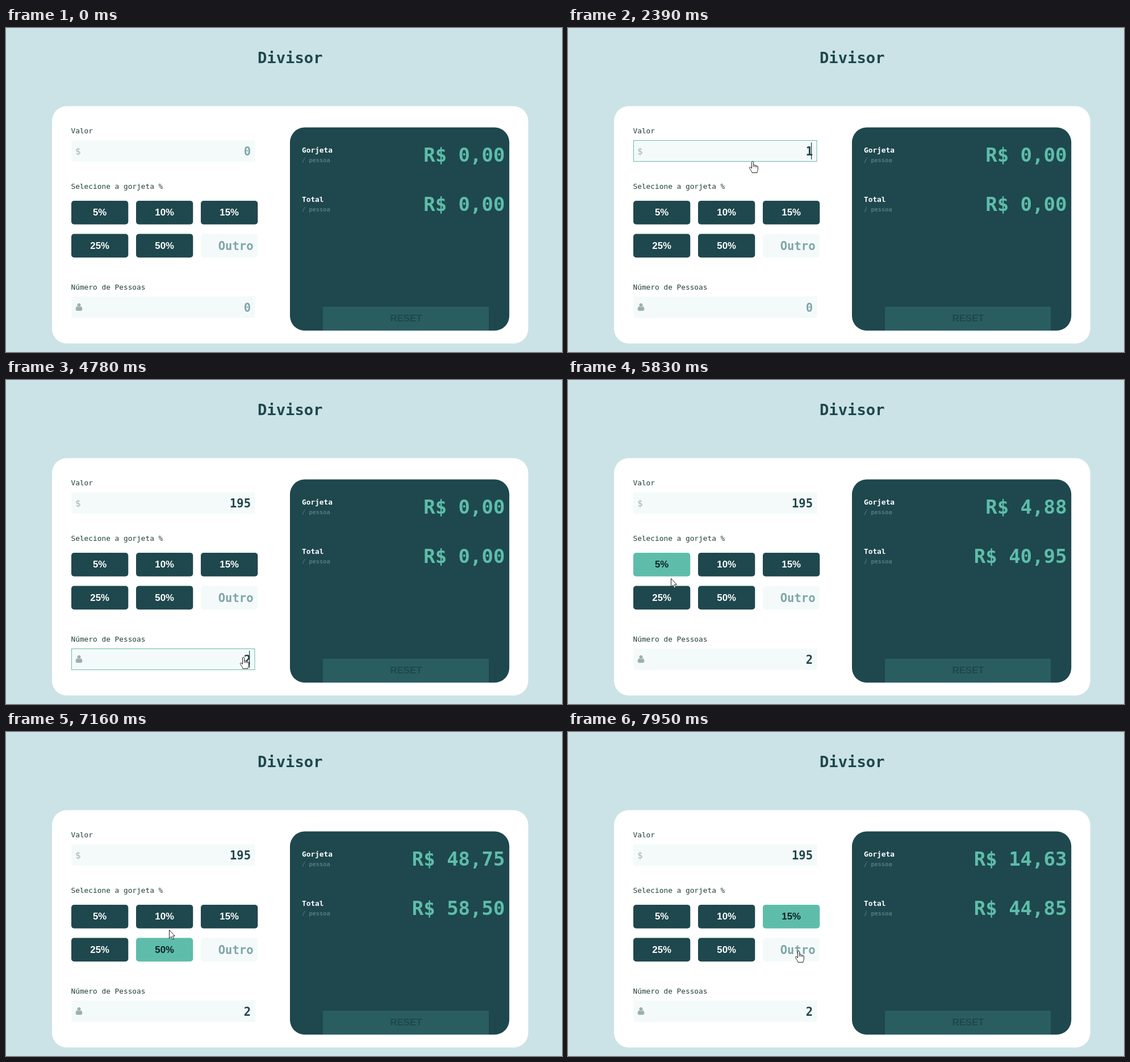
An HTML page that plays this animation: 979x572 px, repeating every 8000 ms.

```html
<!DOCTYPE html>
<html lang="pt">
<head>
<meta charset="utf-8">
<title>Divisor</title>
<style>
  html, body { margin: 0; width: 100%; height: 100%; overflow: hidden; background: #cbe3e6; }
  svg { display: block; }
  text { font-family: "DejaVu Sans Mono", monospace; white-space: pre; }
  .bold { font-weight: bold; }
  .button { font: bold 16.8px "Liberation Sans", Arial, sans-serif; text-anchor: middle; }
  .end { text-anchor: end; }
</style>
</head>
<body>
<svg id="stage" width="979" height="572" viewBox="0 0 979 572"></svg>
<script>
const DARK = '#1e484d', TEAL = '#5ebdaa', FIELD = '#f4fafa', MUTED = '#7fa5aa', INK = '#21403c';
const stage = document.getElementById('stage');

function add(tag, attrs, content = '') {
  const el = document.createElementNS('http://www.w3.org/2000/svg', tag);
  for (const key in attrs) el.setAttribute(key, attrs[key]);
  el.textContent = content;
  return stage.appendChild(el);
}
const box = (x, y, width, height, fill, rx = 0) => add('rect', { x, y, width, height, fill, rx });
const label = (content, x, y, size, fill, cls = '') =>
  add('text', { x, y, 'font-size': size, fill, class: cls }, content);
const show = (el, on) => el.setAttribute('visibility', on ? 'visible' : 'hidden');

label('Divisor', 443, 62, 27.2, DARK, 'bold');
box(81, 138, 838.5, 419, '#fff', 26);
box(500, 175.6, 386.2, 358.7, DARK, 26);
box(558, 492, 292, 42, '#2a5d60');
label('RESET', 704.5, 518, 16.8, DARK, 'button');
label('Selecione a gorjeta %', 114.5, 284, 12.8, INK);

// An input with its caption and the text typed into it from a given time on
const KEY_GAP = 393;
function field(caption, y, typed, typeStart) {
  const x = 115, w = 323.5, h = 38;
  label(caption, x - .5, y - 12.5, 12.8, INK);
  box(x, y, w, h, FIELD);
  return {
    x, y, w, h, typed, typeStart,
    frame: add('rect', { x: x + .5, y: y + .5, width: w - 1, height: h - 1, fill: 'none', stroke: '#66bbae' }),
    text: label('0', 431, y + 27, 20.5, MUTED, 'bold end')
  };
}
const fields = [
  field('Valor', 198, '195', 2390),
  field('Número de Pessoas', 474, '2', 4780)
];
label('$', 122, 223, 16, '#9db3b1');
add('path', {
  d: 'M128.5 486a3 3.1 0 0 1 0 6.2a3 3.1 0 0 1 0-6.2M125.6 491.6q2.9 2.4 5.8 0q2.9 .8 2.9 4.4q0 3.2-2 3.2h-7.6q-2 0-2-3.2q0-3.6 2.9-4.4z',
  fill: '#9cafae'
});

const cell = i => ({ x: 115 + i % 3 * 114, y: 305 + Math.floor(i / 3) * 58.5, w: 100.3, h: 41.8 });
const buttons = [5, 10, 15, 25, 50].map((rate, i) => {
  const { x, y, w, h } = cell(i);
  return {
    rate, x, y, w, h,
    rect: box(x, y, w, h, DARK, 5),
    text: label(rate + '%', x + w / 2, y + 26.2, 16.8, '#fff', 'button')
  };
});
const other = cell(5);
box(other.x, other.y, other.w, other.h, FIELD, 5);
label('Outro', 435.5, 392, 20.5, MUTED, 'bold end');
const controls = [...fields, ...buttons, other];

function result(name, y) {
  label(name, 521, y, 12.8, '#fff', 'bold');
  label('/ pessoa', 521, y + 17, 10.3, '#55797d', 'bold');
  return label('', 878.5, y + 16.5, 34, TEAL, 'bold end');
}
const tipOut = result('Gorjeta', 219.5), totalOut = result('Total', 306.5);

const caret = box(428, 202, 1.2, 30, '#173a3f');
const cursor = d => add('path', { d, fill: '#fff', stroke: '#222', 'stroke-linejoin': 'round' });
const arrow = cursor('M.5 .5V15.2L3.9 12L6.3 17.3L8.7 16.2L6.3 11.1H10.4Z');
const hand = cursor(
  'M-1.5 1.8C-1.5-.1 1.7-.1 1.7 1.8V7.4C2.2 6.3 4.3 6.6 4.4 8C5.1 7.1 7 7.5 7 8.9' +
  'C7.8 8.1 9.4 8.7 9.4 10V14C9.4 16.5 8 17.6 8 20.5H-1C-1 18-4 15.5-5.4 12.6' +
  'C-6.3 10.8-4.4 9.7-3.1 11L-1.5 12.9ZM1.7 7.4V10.5M4.4 8V10.8M7 8.9V11.2');

// Pointer stops; whatever control lies under a stop is clicked shortly after arrival
const ENTRY = { x: 890, y: 610 }, CLICK_DELAY = 215, BLINK = 530, REFRESH = 66.3;
const stop = (leave, arrive, x, y) => ({
  leave, arrive, x, y, click: arrive + CLICK_DELAY, control: controlAt(x, y)
});
const stops = [
  stop(0, 1090, 325, 235),
  stop(3480, 3576, 440, 236),
  stop(3840, 4350, 418, 489),
  stop(4970, 5300, 184, 328),
  stop(5750, 5955, 175, 394),
  stop(6230, 6480, 286, 378),
  stop(7000, 7280, 287, 328),
  stop(7500, 7600, 374, 326),
  stop(7820, 7945, 406, 386)
];

function controlAt(x, y) {
  return controls.find(c => x >= c.x && x < c.x + c.w && y >= c.y && y < c.y + c.h);
}
const smooth = k => k * k * (3 - 2 * k);
const money = value => 'R$ ' + value.toFixed(2).replace('.', ',');

function pointerAt(t) {
  let { x, y } = ENTRY;
  for (const s of stops) {
    const k = smooth(Math.min(1, Math.max(0, (t - s.leave) / (s.arrive - s.leave))));
    x += (s.x - x) * k;
    y += (s.y - y) * k;
  }
  return [Math.round(x), Math.round(y)];
}

function draw(time) {
  const t = time + 4;
  // The pointer moves once per screen refresh
  const [x, y] = pointerAt(260 + Math.floor((t - 260) / REFRESH) * REFRESH);
  const hovered = controlAt(x, y);
  show(arrow, !hovered);
  show(hand, hovered);
  (hovered ? hand : arrow).setAttribute('transform', `translate(${x} ${y})`);

  let focused = null, focusTime = 0, rate = 0;
  for (const { control, click } of stops) {
    if (!control || click > t) continue;
    focused = fields.includes(control) ? control : null;
    focusTime = click;
    rate = control.rate || rate;
  }

  for (const f of fields) {
    const count = Math.min(f.typed.length, Math.max(0, Math.floor((t - f.typeStart) / KEY_GAP) + 1));
    f.text.textContent = f.typed.slice(0, count) || '0';
    f.text.setAttribute('fill', count ? '#20444a' : MUTED);
    show(f.frame, f === focused);
    if (f === focused && count) focusTime = f.typeStart + (count - 1) * KEY_GAP;
  }
  show(caret, focused && Math.floor((t - focusTime) / BLINK) % 2 === 0);
  if (focused) caret.setAttribute('y', focused.y + 4);

  for (const b of buttons) {
    const lit = b.rate === rate || b === hovered;
    b.rect.setAttribute('fill', lit ? TEAL : DARK);
    b.text.setAttribute('fill', lit ? '#0b2023' : '#fff');
  }
  tipOut.textContent = money(195 * rate / 200);
  totalOut.textContent = money(rate && 195 * (100 + rate) / 500);
}

const start = performance.now();
function loop() {
  draw((performance.now() - start) % 8000);
  requestAnimationFrame(loop);
}
loop();
</script>
</body>
</html>
```
